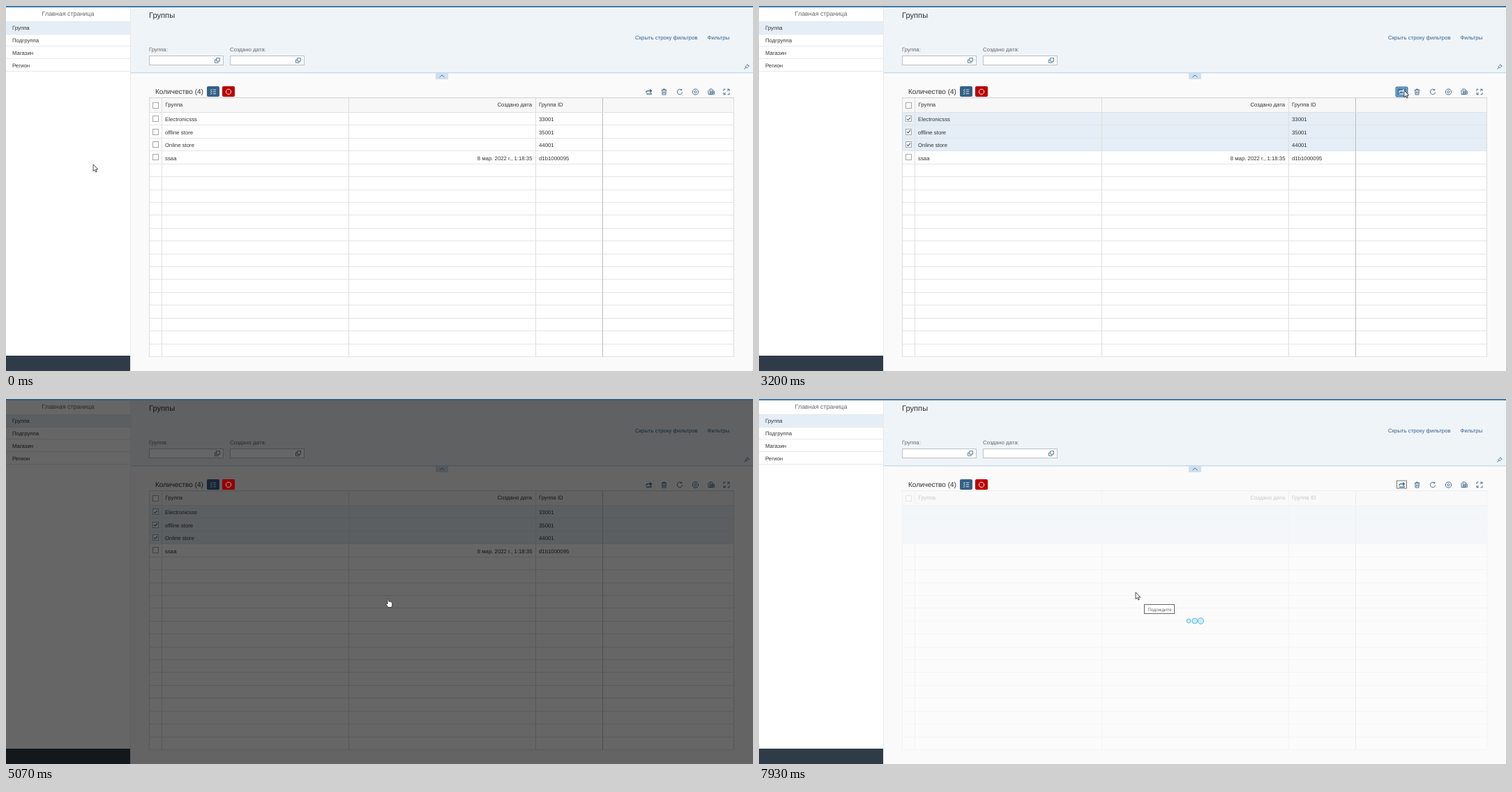
These frames come from a looping animation (1071 px wide and 523 px high, 8000 ms). An HTML page with a canvas:

```html
<!DOCTYPE html>
<html lang="ru">
<head>
<meta charset="utf-8">
<style>
html, body { margin: 0; width: 100%; height: 100%; overflow: hidden; background: #fafafa; }
canvas { display: block; }
</style>
</head>
<body>
<canvas id="stage" width="1071" height="523"></canvas>
<script>
const ctx = document.getElementById('stage').getContext('2d');
const LOOP = 8000, BLUE = '#346187', INK = '#333';
const TOP = 153, ROW = 18.42, ROWS = 19, COLS = [223, 491, 759];
const DATA = [
  ['Electronicsss', '', '33001'],
  ['offline store', '', '35001'],
  ['Online store', '', '44001'],
  ['ssaa', '8 мар. 2022 г., 1:18:35', 'd1b1000095']
];
const CHECKED_AT = [730, 1130, 1600];
const DIALOG_AT = 3270, PRESS_AT = 4800, CLOSE_AT = 4930, DONE_AT = 5270, BUSY_AT = 5470, TIP_AT = 7400;

// Pointer stops: time, x, y
const PATH = [
  [0, 125, 227], [70, 125, 227], [470, 214, 161], [880, 214, 161], [1060, 216, 181], [1220, 216, 181],
  [1450, 218, 203], [1840, 218, 203], [2420, 958, 130], [2670, 946, 130], [2870, 925, 121],
  [3600, 925, 121], [3870, 909, 131], [4680, 544, 289], [4800, 547, 286], [5300, 547, 286],
  [6150, 541, 279], [6500, 540, 277], [8000, 540, 277]
];
const ARROW = 'M0 0V9.6L2.3 7.6 3.8 11 5.3 10.3 3.8 7H6.8Z';
const HAND = 'M0 .8Q1-.3 1.8.8V4.3Q3 3.4 3.6 4.6 4.8 4 5.3 5.2 6.6 4.8 6.8 6V9Q6.6 11 5.5 12.5H1L-2 8.3Q-2.8 6.7-1.4 6.8L0 8Z';
const ICONS = {
  share: 'M3.5-1.3H-1Q-4-1-3.6 1.2M1.5-3.5L4-1.3 1.5 1M-3.5 3.2H3.6V1.5',
  trash: 'M-3.6-2.6H3.6M-1.2-2.6V-4H1.2V-2.6M-2.8-2.6L-2.4 4H2.4L2.8-2.6M-1-.8V2.5M1-.8V2.5',
  refresh: 'M2.3-3A3.7 3.7 0 1 0 3.7.5M2.8-4.2V-2.4H1',
  gear: 'M-1.6-4H1.6L4-1.6V1.6L1.6 4H-1.6L-4 1.6V-1.6ZM1.6 0A1.6 1.6 0 1 0-1.6 0 1.6 1.6 0 1 0 1.6 0',
  sheet: 'M-2-1.5V-4H1L3-2V-1.5M-4-2.5V3.5H2M-1.5-1H4.3V3.3H-1.5ZM-1.5 1.2H4.3M1.4-1V3.3',
  expand: 'M1-3.8H4V-1M4-3.8L1-1M-1 3.8H-4V1M-4 3.8L-1 1M-4-1.2V-3.8H-1.5M4 1.2V3.8H1.5',
  help: 'M-1.3-3.5H3.5V1.2H-1.3ZM-1.3-1H-3.5V3.4H1.2V1.2',
  pin: 'M.6-3.6L3.6-.6M1.2-3L-1.4-.6M3-1.2L.6 1.4M-2.4-.8L.8 2.4M-.8.8L-3.6 3.6',
  list: 'M-4-2.5L-3-1.7-1.5-3.6M-4 .3L-3 1.1-1.5-.8M-4 3L-3 3.8-1.5 1.9M0-2.6H4M0 .2H4M0 3H4',
  ring: 'M-1.5-3.5H1.5L3.5-1.5V1.5L1.5 3.5H-1.5L-3.5 1.5V-1.5Z',
  up: 'M-3.5 1.5L0-1.5 3.5 1.5',
  tick: 'M-2.3 0L-.7 1.7 2.5-2'
};
const TOOLS = [['share', 921.5], ['trash', 943.5], ['refresh', 966], ['gear', 988.5], ['sheet', 1011], ['expand', 1033]];

function rect(x, y, w, h, color) {
  ctx.fillStyle = color;
  ctx.fillRect(x, y, w, h);
}
function frame(x, y, w, h, color, width = 1) {
  ctx.strokeStyle = color;
  ctx.lineWidth = width;
  ctx.strokeRect(x + .5, y + .5, w - 1, h - 1);
}
function pill(x, y, w, h, color, r = 2) {
  ctx.fillStyle = color;
  ctx.beginPath();
  ctx.roundRect(x, y, w, h, r);
  ctx.fill();
}
// y is the middle of the capitals
function text(s, x, y, size = 7.81, color = INK, align = 'left', font = '"Liberation Sans", Arial, sans-serif') {
  ctx.font = `${size}px ${font}`;
  ctx.textRendering = 'geometricPrecision';
  ctx.fillStyle = color;
  ctx.textAlign = align;
  ctx.fillText(s, x, y + size * .36);
}
function path(d, x, y, stroke, width = 1, fill) {
  const shape = new Path2D(d);
  ctx.save();
  ctx.translate(x, y);
  if (fill) { ctx.fillStyle = fill; ctx.fill(shape); }
  ctx.strokeStyle = stroke;
  ctx.lineWidth = width;
  ctx.stroke(shape);
  ctx.restore();
}
const icon = (name, x, y, color = BLUE, width = .9) => path(ICONS[name], x, y, color, width);

function pointerAt(t) {
  const i = Math.max(1, PATH.findIndex(p => p[0] > t));
  const [t0, x0, y0] = PATH[i - 1], [t1, x1, y1] = PATH[i];
  const u = (t - t0) / (t1 - t0), k = u * u * (3 - 2 * u);
  return [x0 + (x1 - x0) * k, y0 + (y1 - y0) * k];
}

function sidebar() {
  rect(0, 0, 178, 523, '#fff');
  text('Главная страница', 89, 11, 8.92, '#666', 'center');
  rect(0, 22, 178, 18, '#e5eef6');
  ['Группа', 'Подгруппа', 'Магазин', 'Регион'].forEach((s, i) => {
    text(s, 9, 31.5 + i * 17.9);
    rect(0, 40 + i * 17.9 | 0, 178, 1, '#e8e8e8');
  });
  rect(0, 22, 178, 1, '#e5e5e5');
  rect(0, 501, 178, 22, '#2f3c48');
  rect(178, 0, 1, 523, '#e8ebee');
}

function filterBar() {
  rect(178, 0, 893, 95, '#eff4f9');
  rect(178, 95, 893, 1, '#c3d8e8');
  rect(178, 96, 893, 1, '#e9eff4');
  text('Группы', 205, 13, 11.16);
  text('Скрыть строку фильтров', 902, 45, 7.81, BLUE);
  text('Фильтры', 1005.5, 45, 7.81, BLUE);
  [['Группа:', 205], ['Создано дата:', 321]].forEach(([label, x]) => {
    text(label, x, 62.5, 7.81, '#666');
    rect(x, 71, 107, 14, '#fff');
    frame(x, 71, 107, 14, '#bfbfbf');
    icon('help', x + 98, 78, BLUE, .8);
  });
  icon('pin', 1062, 87, BLUE, .8);
  rect(616, 96, 18, 9, '#cfe0ee');
  icon('up', 625, 100.5, BLUE, .8);
}

function redButton() {
  pill(310, 115, 18, 15, '#bb0000');
  icon('ring', 319, 122.8, '#fff');
}

function toolbar(t, [px, py]) {
  text('Количество (4)', 214, 122.5, 10.04);
  pill(288, 115, 18, 15, BLUE);
  icon('list', 297, 122.7, '#fff', .8);
  redButton();
  const pressed = t >= 3070 && t < DIALOG_AT;
  const focused = t >= DIALOG_AT && t < CLOSE_AT + 140 || t >= DONE_AT;
  TOOLS.forEach(([name, x], i) => {
    const hover = t < DIALOG_AT && Math.abs(px - x) < 9 && Math.abs(py - 123) < 8;
    if (i === 0 && pressed) {
      pill(x - 9, 115.5, 18, 15, '#427cac');
      frame(x - 7.5, 117, 15, 12, '#a9c6dd', .7);
    } else if (hover) {
      pill(x - 9, 115.5, 18, 15, '#e8eef3');
    }
    if (i === 0 && focused) frame(x - 7.5, 116.5, 15, 12, '#555', .8);
    icon(name, x, 123, i === 0 && pressed ? '#fff' : BLUE, i ? .9 : 1.2);
  });
}

function checkbox(y, on, active) {
  rect(210, y - 4.5, 9, 9, '#fff');
  frame(210, Math.round(y - 5), 9, 9, active ? '#2f7fc0' : '#a6a6a6', active ? 1.2 : 1);
  if (on) icon('tick', 214.5, y - .4, BLUE, 1.1);
}

function table(t, [px, py]) {
  const loaded = t < DONE_AT;
  const modal = t >= DIALOG_AT && t < DONE_AT;
  const hoverRow = !modal && t < BUSY_AT && px > 206 && px < 1043 ? Math.floor((py - TOP) / ROW) : -1;
  const focusRow = t < 2870 ? CHECKED_AT.filter(c => t >= c).length - 1 : -1;
  const rowY = i => Math.round(TOP + i * ROW);

  rect(206, 132, 838, 371, '#fff');
  rect(206, 132, 838, 21, '#f7f7f7');
  for (let i = 0; i < ROWS; i++) {
    const selected = t >= CHECKED_AT[i], hover = i === hoverRow;
    if (selected || hover)
      rect(206, rowY(i), 838, rowY(i + 1) - rowY(i), selected ? hover ? '#dce7f1' : '#e5eef6' : '#efefef');
    rect(206, rowY(i + 1) - 1, 838, 1, selected ? '#dde5ec' : '#e5e5e5');
  }
  COLS.forEach(x => rect(x, 132, 1, 371, '#dedede'));
  rect(855, 132, 1, 371, '#bfbfbf');
  rect(205, 131, 839, 1, '#d0d0d0');
  rect(205, 152, 839, 1, '#e0e0e0');
  rect(205, 132, 1, 371, '#dcdcdc');
  rect(1043, 132, 1, 371, '#dcdcdc');

  checkbox(142.5);
  text('Группа', 228.5, 141.5);
  text('Создано дата', 754, 141.5, 7.81, INK, 'right');
  text('Группа ID', 764, 141.5);
  if (loaded) DATA.forEach(([name, date, id], i) => {
    const y = TOP + (i + .5) * ROW;
    checkbox(y, t >= CHECKED_AT[i], i === hoverRow && px < 223);
    text(name, 228, y + .3);
    text(date, 754.5, y + .3, 7.81, INK, 'right');
    text(id, 764, y + .3);
    if (i === focusRow) {
      ctx.setLineDash([1, 1]);
      frame(206, rowY(i), 17, 18, '#222');
      ctx.setLineDash([]);
    }
  });
}

function dialog(t, [px, py]) {
  if (t >= CLOSE_AT + 140) return;
  ctx.save();
  ctx.globalAlpha = t < CLOSE_AT ? 1 : 1 - (t - CLOSE_AT) / 140;
  ctx.shadowColor = 'rgba(0,0,0,.35)';
  ctx.shadowBlur = 26;
  ctx.shadowOffsetY = 8;
  pill(446, 221, 178.6, 82, '#fff');
  ctx.shadowColor = 'transparent';
  rect(446, 246.5, 178.6, 1.3, '#666');
  frame(496.5, 230.5, 8, 8, '#5a7286', .8);
  text('?', 500.5, 234.6, 6.5, BLUE, 'center');
  text('Подтверждение', 508.5, 234.5, 8.92, '#666');
  text('Точно восстановить?', 455, 262);
  rect(446, 276, 178.6, 1, '#ebebeb');
  const pressed = t >= PRESS_AT;
  if (pressed || px < 566 && py > 281) pill(545, 282, 21, 16, pressed ? '#427cac' : '#eaeef2');
  text('ОК', 555.3, 290, 7.81, pressed ? '#fff' : BLUE, 'center');
  text('Отменить', 597, 290, 7.81, BLUE, 'center');
  ctx.restore();
}

function busy(t) {
  rect(205, 131, 839, 373, 'rgba(250,250,250,.75)');
  [616, 624.7, 633.4].forEach((x, i) => {
    const phase = (t - 7930 + 560 + (2 - i) * 160 + LOOP * 1.4) % 1400 / 560;
    const grow = phase < 2 ? (1 - Math.cos(phase * Math.PI)) / 2 : 0;
    ctx.beginPath();
    ctx.arc(x, 318, 2 + 2.3 * grow, 0, 7);
    ctx.fillStyle = '#cfeaf8';
    ctx.fill();
    ctx.strokeStyle = '#5bb9e6';
    ctx.lineWidth = 1;
    ctx.stroke();
  });
  if (t >= TIP_AT) {
    rect(552, 294.5, 44.5, 14, '#fff');
    frame(552, 294, 44, 14, '#666');
    text('Подождите', 574.3, 301.6, 6.3, '#555', 'center', '"Open Sans", sans-serif');
  }
}

function draw(t) {
  const pointer = pointerAt(t);
  rect(0, 0, 1071, 523, '#fafafa');
  filterBar();
  sidebar();
  rect(0, 0, 1071, 2, '#427cac');
  toolbar(t, pointer);
  table(t, pointer);
  if (t >= DIALOG_AT && t < DONE_AT) {
    rect(0, 0, 1071, 523, 'rgba(0,0,0,.6)');
    ctx.globalAlpha = .6;
    redButton();
    rect(0, 0, 1071, 2, '#427cac');
    ctx.globalAlpha = 1;
    dialog(t, pointer);
  }
  if (t >= BUSY_AT) busy(t);
  const hand = t >= 4600 && t < DONE_AT;
  path(hand ? HAND : ARROW, ...pointer, '#222', .8, '#fff');
}

function tick() {
  draw(performance.now() % LOOP);
  requestAnimationFrame(tick);
}
tick();
</script>
</body>
</html>
```
